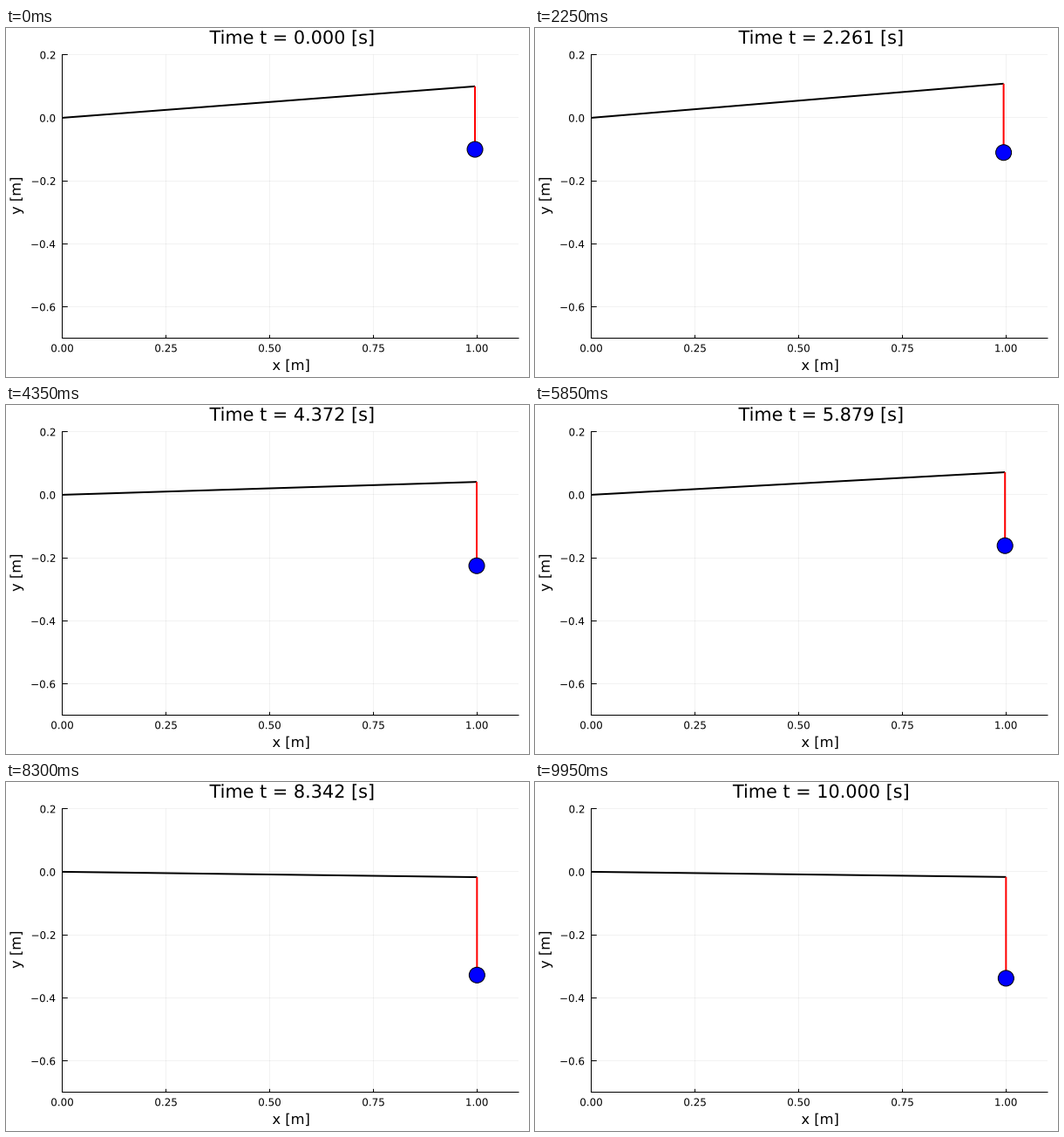
A matplotlib script that plays this animation: 600x400 px, repeating every 10000 ms.

```python
import numpy as np
import matplotlib.pyplot as plt
from matplotlib.animation import FuncAnimation
from matplotlib.patches import Circle, PathPatch
from matplotlib.textpath import TextPath
from matplotlib.transforms import Affine2D

plt.rcParams["font.family"] = "DejaVu Sans"

W, H, DPI = 600, 400, 100
PT = 72 / DPI                      # points per pixel
FRAMES, INTERVAL, DURATION = 200, 50, 10.0

LEFT, RIGHT, TOP, BOTTOM = 64.5, 588.0, 30.7, 355.7
X_MAX, Y_MIN, Y_MAX = 1.1, -0.7, 0.2
TICK = 0.012                       # tick length as a share of the axis

# Two vibration modes of a sprung beam carrying a mass on a spring
SLOW, FAST = 5.479, 20.51          # rad/s
SLOW_RATIO, FAST_RATIO = 0.544, -0.7
TIP_REST, MASS_REST = -0.0003, -0.299
TIP_START, MASS_START = np.sin(0.1), np.sin(0.1) - 0.2


def mode_amplitudes():
    """Mass amplitude of the slow mode and tip amplitude of the fast one."""
    shape = [[1, FAST_RATIO], [SLOW_RATIO, 1]]
    return np.linalg.solve(shape, [MASS_START - MASS_REST, TIP_START - TIP_REST])


SLOW_AMP, FAST_AMP = mode_amplitudes()


def px(x):
    return LEFT + x / X_MAX * (RIGHT - LEFT)


def py(y):
    return TOP + (Y_MAX - y) / (Y_MAX - Y_MIN) * (BOTTOM - TOP)


def crisp(p):
    """Centre of the pixel that holds p."""
    return np.floor(p) + 0.5


def pose(t):
    """Heights of the beam tip and of the mass."""
    slow = SLOW_AMP * np.cos(SLOW * t)
    fast = FAST_AMP * np.cos(FAST * t)
    tip = TIP_REST + SLOW_RATIO * slow + fast
    mass = MASS_REST + slow + FAST_RATIO * fast
    return tip, mass


fig = plt.figure(figsize=(W / DPI, H / DPI), dpi=DPI, facecolor="white")
ax = fig.add_axes([0, 0, 1, 1])
ax.set_xlim(0, W)
ax.set_ylim(H, 0)
ax.axis("off")


def line(xs, ys, color="black", width=1.0, **kw):
    kw.setdefault("solid_capstyle", "butt")
    return ax.plot(xs, ys, color=color, lw=width * PT, snap=False, **kw)[0]


def text_path(x, y, text, size, align=0.5, angle=0):
    """Outline of text on baseline y; align is the share of ink left of x."""
    path = TextPath((0, 0), text, size=size)
    box = path.get_extents()
    shift = -(box.x0 + align * box.width)
    move = Affine2D().translate(shift, 0).scale(1, -1).rotate_deg(-angle)
    return path.transformed(move.translate(x, y))


def label(*args, **kw):
    patch = PathPatch(text_path(*args, **kw), fc="black", lw=0, snap=False)
    return ax.add_patch(patch)


def draw_axes():
    left, top, bottom = crisp(LEFT), crisp(TOP), crisp(BOTTOM)
    for x in (0, 0.25, 0.5, 0.75, 1):
        p = crisp(px(x))
        line([p, p], [top, bottom], alpha=0.05, zorder=1)
        line([p, p], [BOTTOM, BOTTOM - TICK * (BOTTOM - TOP)], zorder=2)
        label(px(x), 371.2, f"{x:.2f}", 11.9)
    for y in (0.2, 0.0, -0.2, -0.4, -0.6):
        p = crisp(py(y))
        line([left, RIGHT], [p, p], alpha=0.05, zorder=1)
        line([LEFT, LEFT + TICK * (RIGHT - LEFT)], [p, p], zorder=2)
        label(56.3, py(y) + 4.7, f"{y:.1f}".replace("-", "\u2212"), 11.9, 1)
    line([left, left], [top, bottom], solid_capstyle="projecting", zorder=2)
    line([left, RIGHT], [bottom, bottom], solid_capstyle="projecting", zorder=2)
    label(326.7, 392, "x [m]", 16.3)
    label(16.8, 192.7, "y [m]", 16.3, angle=90)


def title_path(t):
    return text_path(327.4, 18, f"Time t = {t:.3f} [s]", 20.8)


draw_axes()
title = ax.add_patch(PathPatch(title_path(0), fc="black", lw=0, snap=False))
beam = line([], [], width=2, zorder=3)
spring = line([], [], "red", 2, zorder=4)
ball = Circle((0, 0), 9, fc="blue", ec="black", lw=PT, zorder=5)
ax.add_patch(ball)


def update(i):
    t = i * DURATION / (FRAMES - 1)
    tip, mass = pose(t)
    x = px(np.sqrt(1 - tip ** 2))
    beam.set_data([LEFT, x], [py(0), py(tip)])
    spring.set_data([x, x], [py(tip), py(mass)])
    ball.center = (x, py(mass))
    title.set_path(title_path(t))
    return beam, spring, ball, title


anim = FuncAnimation(fig, update, frames=FRAMES, interval=INTERVAL,
                     repeat=True, repeat_delay=0)
plt.show()
```
